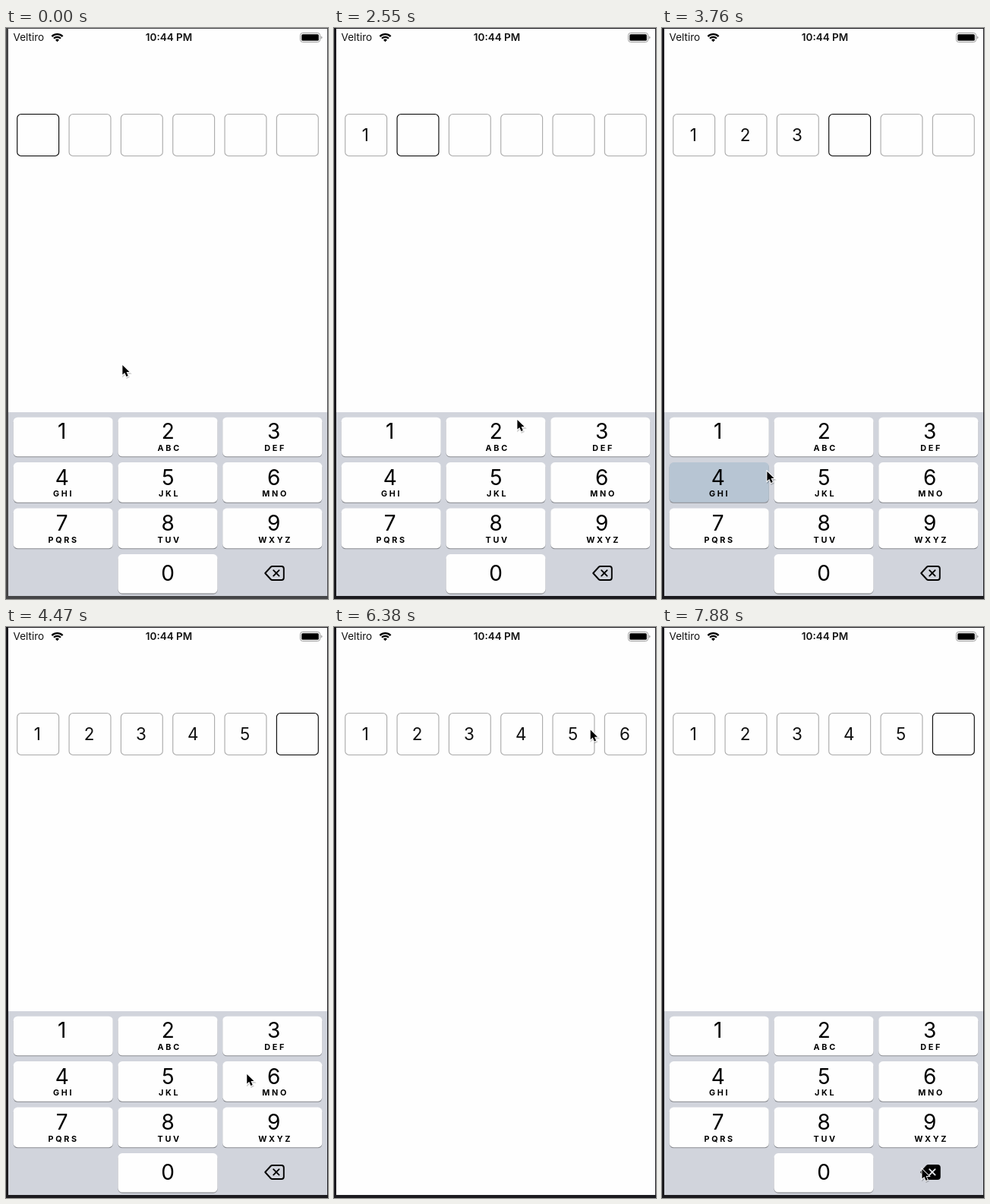
Animation of 424x752 px, one loop 8000 ms. Source, as an HTML page:

```html
<!DOCTYPE html>
<html lang="en">
<head>
<meta charset="utf-8">
<title>Code entry</title>
<style>
  html, body { margin: 0; width: 100%; height: 100%; overflow: hidden; background: #fefefe; }
  svg { display: block; width: 100%; height: 100%; font-family: Inter, "Liberation Sans", sans-serif; }
  .status { font-size: 13.5px; fill: #111; }
  .box { fill: #fefefe; stroke: #aaa; stroke-width: 1.12; }
  .box.active { stroke: #000; }
  .digit { font-size: 22.4px; fill: #111; text-anchor: middle; }
  .shade { fill: #898b90; }
  .key { fill: #fefefe; }
  .key.down { fill: #b7c5d3; }
  .num { font-size: 28px; text-anchor: middle; }
  .abc { font-size: 10.8px; font-weight: 700; letter-spacing: 2.7px; text-anchor: middle; }
  #erase { fill: none; stroke: #000; stroke-width: 1.9; stroke-linecap: round; stroke-linejoin: round; }
  #erase.down .body { fill: #000; }
  #erase.down .cross { stroke: #e4e6ea; }
</style>
</head>
<body>
<svg viewBox="0 0 424 752">
  <defs><path id="arrow" d="M0 0V12.6L2.9 9.9 5.1 15 7.4 14 5.2 9.1H9.2z"/></defs>
  <rect width="424" height="752" fill="#fefefe"/>
  <g class="status">
    <text x="9.5" y="17.3">Veltiro</text>
    <text x="214.5" y="17.3" font-weight="600" text-anchor="middle">10:44 PM</text>
    <g fill="none" stroke="#000" stroke-width="2.3">
      <path d="M60.4 11.1a10 10 0 0 1 14.2 0M63 13.7a6.3 6.3 0 0 1 9 0"/>
      <path d="M67.5 18.3l-2.5-2.6a3.6 3.6 0 0 1 5 0z" fill="#000" stroke="none"/>
    </g>
    <rect x="387.5" y="6.5" width="26" height="12" rx="3" fill="none" stroke="#999"/>
    <rect x="389.2" y="8.2" width="22.6" height="8.6" rx="1.5" fill="#000"/>
    <path d="M414.8 10.5q1.6 .6 1.6 2t-1.6 2z" fill="#999"/>
  </g>
  <g id="boxes"></g>
  <g id="keyboard">
    <rect x="3" y="506" width="420" height="246" fill="#d1d4dc"/>
    <g id="keys"></g>
    <g id="erase">
      <path class="body" d="M341.2 718l7.3-8q.9-1 2.3-1h12q3 0 3 3v12q0 3-3 3h-12q-1.4 0-2.3-1z"/>
      <path class="cross" d="M352.2 714.2l7.4 7.4m0-7.4l-7.4 7.4"/>
    </g>
  </g>
  <path id="frame" fill-rule="evenodd" d="M0 0H424V752H0zM3 1V748H423V1z"/>
  <g id="cursor">
    <use href="#arrow" x=".8" y="1.6" stroke="#000" stroke-width="2" opacity=".18"/>
    <use href="#arrow" stroke="#fff" stroke-width="1.8" paint-order="stroke"/>
  </g>
</svg>
<script>
const LOOP = 8000, SLIDE = 500, HIDE_AT = 4756, SHOW_AT = 6720, ERASE_AT = 7880;
const POINT = 1.12; // pixels per layout point
const KEYBOARD_TOP = 506, KEYBOARD_HEIGHT = 216 * POINT;
const $ = id => document.getElementById(id);

function add(parent, tag, className, attrs, text = '') {
  const el = document.createElementNS('http://www.w3.org/2000/svg', tag);
  el.setAttribute('class', className);
  for (const name in attrs) el.setAttribute(name, attrs[name]);
  el.textContent = text;
  parent.append(el);
  return el;
}

const boxes = [], digits = [];
for (let i = 0; i < 6; i++) {
  const x = 3 + (10.5 + 61 * i) * POINT, size = 49 * POINT;
  boxes.push(add($('boxes'), 'rect', 'box', { x, y: 113.56, width: size, height: size, rx: 5 }));
  digits.push(add($('boxes'), 'text', 'digit', { x: x + size / 2 - .9, y: 149.2 }, i + 1));
}

// Rows share the height evenly; their edges snap outward to whole points.
const keys = [];
function addKey(label, col, row, caption = '') {
  const x = 3 + (6 + 123 * col) * POINT;
  const pitch = 161 / 3 * row;
  const y = KEYBOARD_TOP + Math.floor(6 + pitch) * POINT;
  const bottom = KEYBOARD_TOP + Math.ceil(52 + pitch - .001) * POINT;
  const shape = { x, y, width: 117 * POINT, height: bottom - y, rx: 5.5 };
  const center = 73.7 + 139.5 * col;
  add($('keys'), 'rect', 'shade', { ...shape, y: y + 1.1 });
  keys[label] = add($('keys'), 'rect', 'key', shape);
  add($('keys'), 'text', 'num', { x: center, y: bottom - (label ? 23.2 : 16.6) }, label);
  add($('keys'), 'text', 'abc', { x: center + 2, y: bottom - 7.5 }, caption);
}
' ABC DEF GHI JKL MNO PQRS TUV WXYZ'.split(' ')
  .forEach((caption, i) => addKey(i + 1, i % 3, Math.floor(i / 3), caption));
addKey(0, 1, 3);

// Typing speeds up with every key.
const pressTime = i => 2020 + i * (647 - 29 * i);
const HOLD = 110;

// pointer moves: start, target x, target y, duration
const QUICK = 140;
const moves = [
  [30, 130.5, 390, 670],
  [1090, 14, 129.5, QUICK],
  [1410, 108, 330, QUICK],
  [1700, 97, 511, QUICK],
  [2200, 241, 516, 350],
  [2840, 312, 525, 250],
  [3300, 138, 584, 370],
  [3880, 318, 589, 620],
  [5470, 199, 282, QUICK],
  [5840, 253, 118, QUICK],
  [6100, 373, 143, 440],
  [6960, 308, 662, 270],
  [7380, 342, 714, QUICK]
];

const clamp = u => Math.min(1, Math.max(0, u));

function pointer(t) {
  let x = 153, y = 444;
  for (const [start, toX, toY, duration] of moves) {
    const u = clamp((t - start) / duration), k = u * u * (3 - 2 * u);
    x += (toX - x) * k;
    y += (toY - y) * k;
  }
  return [x, y];
}

// cubic-bezier(.38, .7, .125, 1)
function slide(t) {
  const u = clamp(t / SLIDE);
  const curve = (s, p, q) => 3 * s * (1 - s) ** 2 * p + 3 * s * s * (1 - s) * q + s ** 3;
  let lo = 0, hi = 1;
  for (let i = 0; i < 24; i++) {
    const mid = (lo + hi) / 2;
    if (curve(mid, .38, .125) < u) lo = mid; else hi = mid;
  }
  return curve(hi, .7, 1);
}

function draw(now) {
  const t = now % LOOP;
  const typed = t >= ERASE_AT ? 5 : digits.filter((_, i) => t >= pressTime(i) + HOLD).length;
  const active = t >= SHOW_AT ? 5 : typed;
  boxes.forEach((box, i) => {
    const sincePress = t - pressTime(i);
    box.classList.toggle('active', i === active);
    digits[i].setAttribute('visibility', i < typed ? 'visible' : 'hidden');
    keys[i + 1].classList.toggle('down', sincePress >= 0 && sincePress < HOLD + 30);
  });
  $('erase').classList.toggle('down', t >= ERASE_AT);

  const drop = KEYBOARD_HEIGHT * (slide(t - HIDE_AT) - slide(t - SHOW_AT));
  $('keyboard').setAttribute('transform', `translate(0 ${drop.toFixed(2)})`);
  $('frame').setAttribute('fill', t < 840 ? '#454547' : '#1b1a1e');
  const [x, y] = pointer(t);
  $('cursor').setAttribute('transform', `translate(${(x + .4).toFixed(2)} ${y.toFixed(2)})`);
  requestAnimationFrame(draw);
}
requestAnimationFrame(draw);
</script>
</body>
</html>
```
